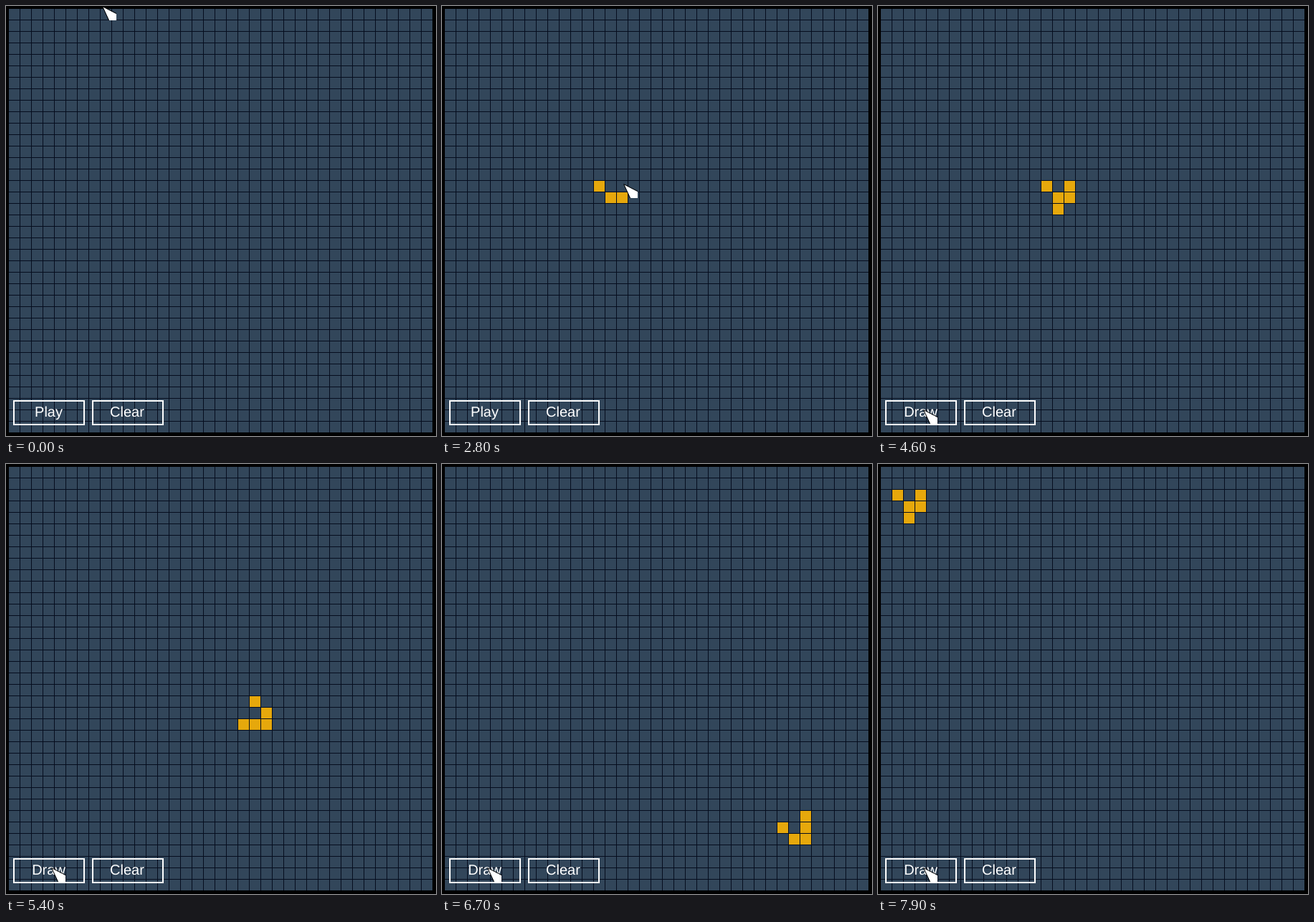
Write an HTML page that moves like this. It is 600 px wide and 600 px high and loops after 8 s.

```html
<!DOCTYPE html>
<html lang="en">
<head>
<meta charset="utf-8">
<title>Cell grid</title>
<style>
  html, body { margin: 0; width: 100%; height: 100%; overflow: hidden; background: #000; }
  svg { display: block; width: 100vw; height: 100vh; }
  text {
    font: 20px "Liberation Sans", Arial, sans-serif; fill: #fff;
    text-anchor: middle; text-rendering: geometricPrecision;
  }
  .button { fill: none; stroke: #fff; stroke-width: 2; }
</style>
</head>
<body>
<svg viewBox="0 0 600 600">
  <defs>
    <pattern id="grid" x="4" y="4" width="16" height="16" patternUnits="userSpaceOnUse">
      <rect width="16" height="16" fill="#050d1e"/>
      <rect width="15" height="15" fill="#32465a"/>
    </pattern>
  </defs>
  <rect width="600" height="600" fill="#000"/>
  <rect x="4" y="4" width="591" height="591" fill="url(#grid)" shape-rendering="crispEdges"/>
  <path id="cells" fill="#e6a80c" shape-rendering="crispEdges"/>
  <rect class="button" x="11" y="551" width="98" height="33"/>
  <rect class="button" x="121" y="551" width="98" height="33"/>
  <text id="mode" x="59.5" y="573">Play</text>
  <text x="169" y="573">Clear</text>
  <g id="cursor">
    <path d="M0 0 L19 10 V19 H9 Z" fill="#fff"/>
    <path d="M8.5 19 L-.3 -.3 L19 9.5" fill="none" stroke="#000"/>
  </g>
</svg>
<script>
const LOOP = 8000, TICK = 100;
const COLS = 37, CELL = 16, MARGIN = 4;
const PLAY_AT = 4600, GENERATIONS_PER_TICK = 2.91, REST = 200;

// Key points of the cursor; it rests after each click
const stops = [
  { t: 0, x: 135, y: 1 },
  { t: 400, x: 268, y: 317 },
  { t: 1000, x: 221, y: 252, click: true },
  { t: 1700, x: 240, y: 270, click: true },
  { t: 2300, x: 254, y: 269, click: true },
  { t: 2800, x: 254, y: 249, click: true },
  { t: 3500, x: 254, y: 234, click: true },
  { t: 4400, x: 64, y: 564 }
];

const byId = id => document.getElementById(id);
const cells = byId("cells"), mode = byId("mode"), cursor = byId("cursor");

const toCell = v => Math.floor((v - MARGIN) / CELL);
const wrap = v => (v + COLS) % COLS;

// A cell is the number row * COLS + col
const paintedCells = t => stops
  .filter(s => s.click && s.t + REST <= t)
  .map(s => toCell(s.y) * COLS + toCell(s.x));

// One step of the Game of Life on a torus
function evolve(live) {
  const neighbours = new Map();
  for (const cell of live) {
    const col = cell % COLS, row = Math.floor(cell / COLS);
    for (let dy = -1; dy <= 1; dy++) {
      for (let dx = -1; dx <= 1; dx++) {
        if (!dx && !dy) continue;
        const near = wrap(row + dy) * COLS + wrap(col + dx);
        neighbours.set(near, (neighbours.get(near) || 0) + 1);
      }
    }
  }
  return [...neighbours]
    .filter(([cell, n]) => n === 3 || (n === 2 && live.includes(cell)))
    .map(([cell]) => cell);
}

function liveCells(t) {
  let live = paintedCells(t);
  if (t < PLAY_AT) return live;
  const ticks = (t - PLAY_AT) / TICK + 1;
  const generations = Math.floor(GENERATIONS_PER_TICK * ticks + 0.5);
  for (let i = 0; i < generations; i++) live = evolve(live);
  return live;
}

function cursorAt(t) {
  const i = stops.findIndex(s => s.t > t);
  if (i < 0) return [stops.at(-1).x, stops.at(-1).y];
  const a = stops[i - 1], b = stops[i];
  const leave = a.t + (a.click ? REST : 0);
  const u = Math.max(0, (t - leave) / (b.t - leave));
  const ease = u * u * (3 - 2 * u);
  return [a.x + (b.x - a.x) * ease, a.y + (b.y - a.y) * ease].map(Math.round);
}

function cellPath(cell) {
  const x = MARGIN + cell % COLS * CELL;
  const y = MARGIN + Math.floor(cell / COLS) * CELL;
  return `M${x} ${y}h15v15h-15z`;
}

function draw(t) {
  cells.setAttribute("d", liveCells(t).map(cellPath).join(""));
  mode.textContent = t < PLAY_AT ? "Play" : "Draw";
  cursor.setAttribute("transform", `translate(${cursorAt(t)})`);
}

const start = performance.now();
let shown = -1;
function frame() {
  const elapsed = (performance.now() - start) % LOOP;
  const t = Math.floor(elapsed / TICK) * TICK;
  if (t !== shown) draw(shown = t);
  requestAnimationFrame(frame);
}
frame();
</script>
</body>
</html>
```
